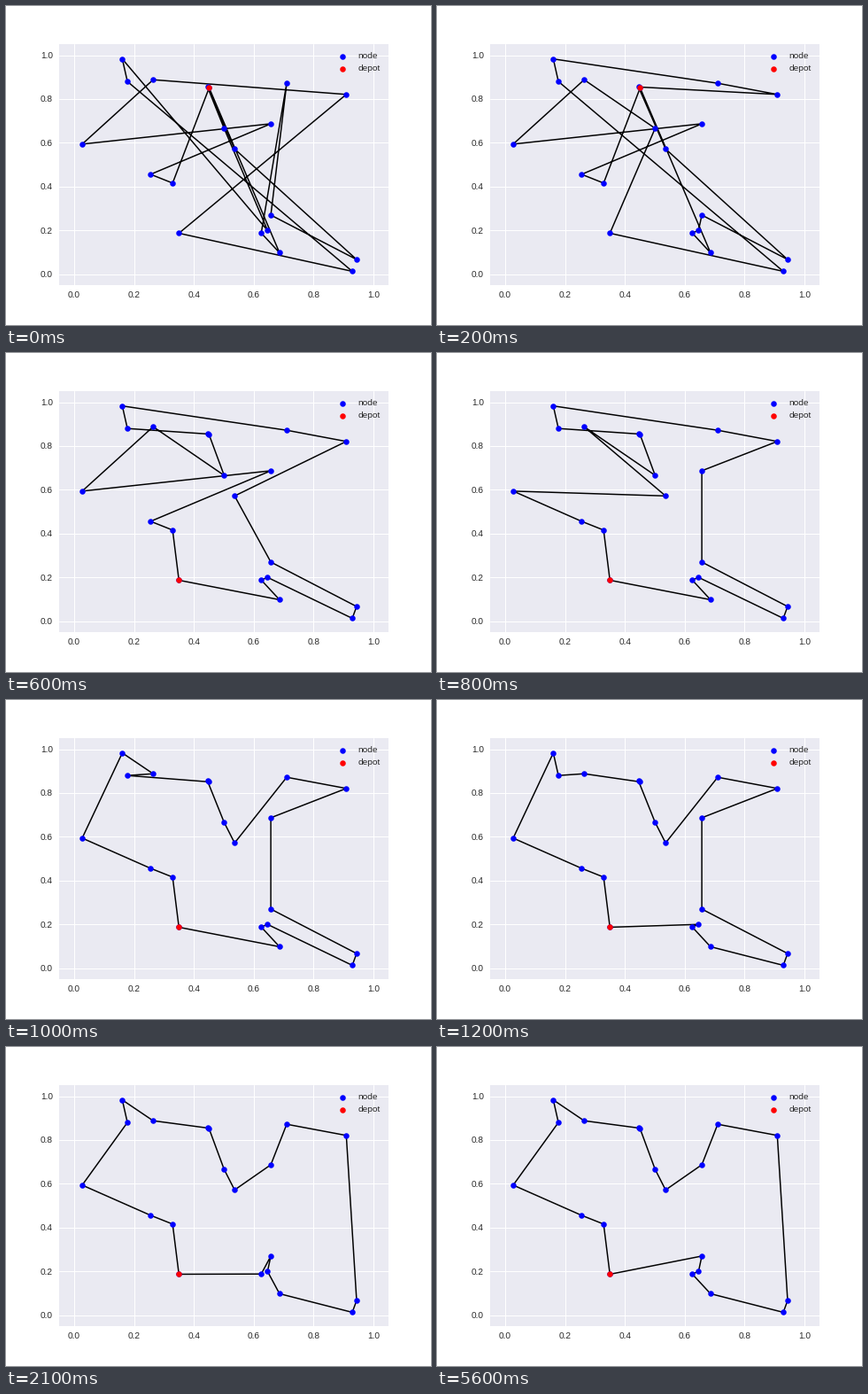
Animation, 480 px wide and 360 px high, one loop 8 s. Source, as a matplotlib script:

```python
import matplotlib.pyplot as plt
import numpy as np
from matplotlib.animation import FuncAnimation

plt.style.use("seaborn-v0_8")
plt.rcParams.update({
    "font.sans-serif": ["Liberation Sans"],
    "text.hinting": "native",
    "lines.linewidth": 1.5,
})

DPI = 72
STEP = 100  # ms
FRAMES = 80

# the nodes in the order of the first tour
NODES = np.array([
    (.451, .851), (.686, .098), (.625, .188), (.710, .872), (.657, .270),
    (.9435, .067), (.536, .572), (.4455, .855), (.501, .666), (.646, .200),
    (.161, .983), (.178, .880), (.929, .013), (.350, .187), (.909, .821),
    (.264, .888), (.027, .594), (.657, .687), (.2555, .456), (.329, .416),
])

# improvements of the local search: exchanges first, then relocations
SWAPS = [(9, 3), (8, 14), (4, 12), (13, 0), (7, 4), (6, 4), (6, 17), (16, 6),
         (10, 6), (11, 8), (11, 15), (9, 1), (2, 9), (10, 11), (7, 0)]
SHIFTS = [(17, 3), (4, 2), (2, 9)]
STEPS = [*range(1, 15), 16, 20, 21, 56]


def swap(tour, a, b):
    """Exchange nodes a and b."""
    i, j = tour.index(a), tour.index(b)
    tour[i], tour[j] = b, a


def shift(tour, a, b):
    """Move node a to the place right after node b."""
    tour.remove(a)
    tour.insert(tour.index(b) + 1, a)


def tour_at(step):
    tour = list(range(len(NODES)))
    moves = [(swap, *p) for p in SWAPS] + [(shift, *p) for p in SHIFTS]
    for when, (move, a, b) in zip(STEPS, moves):
        if when <= step:
            move(tour, a, b)
    return tour


def dots(points, color, label, zorder):
    return ax.scatter(*points.T, s=20, linewidths=2, c=color,
                      edgecolors=color, label=label, zorder=zorder)


fig = plt.figure(figsize=(480 / DPI, 360 / DPI), dpi=DPI)
ax = fig.add_axes([.125, .125, .775, .755])
ticks = np.arange(6) / 5
ax.set(xlim=(-.05, 1.05), ylim=(-.05, 1.05), xticks=ticks, yticks=ticks)

route, = ax.plot([], [], color="black", zorder=2)
dots(NODES, "blue", "node", 3)
depot = dots(NODES[:1], "red", "depot", 4)
ax.legend(loc="upper right")


def draw(step):
    tour = tour_at(step)
    route.set_data(*NODES[tour + tour[:1]].T)
    depot.set_offsets(NODES[tour[:1]])
    return route, depot


anim = FuncAnimation(fig, draw, frames=FRAMES, interval=STEP,
                     repeat=True, repeat_delay=0)
plt.show()
```
